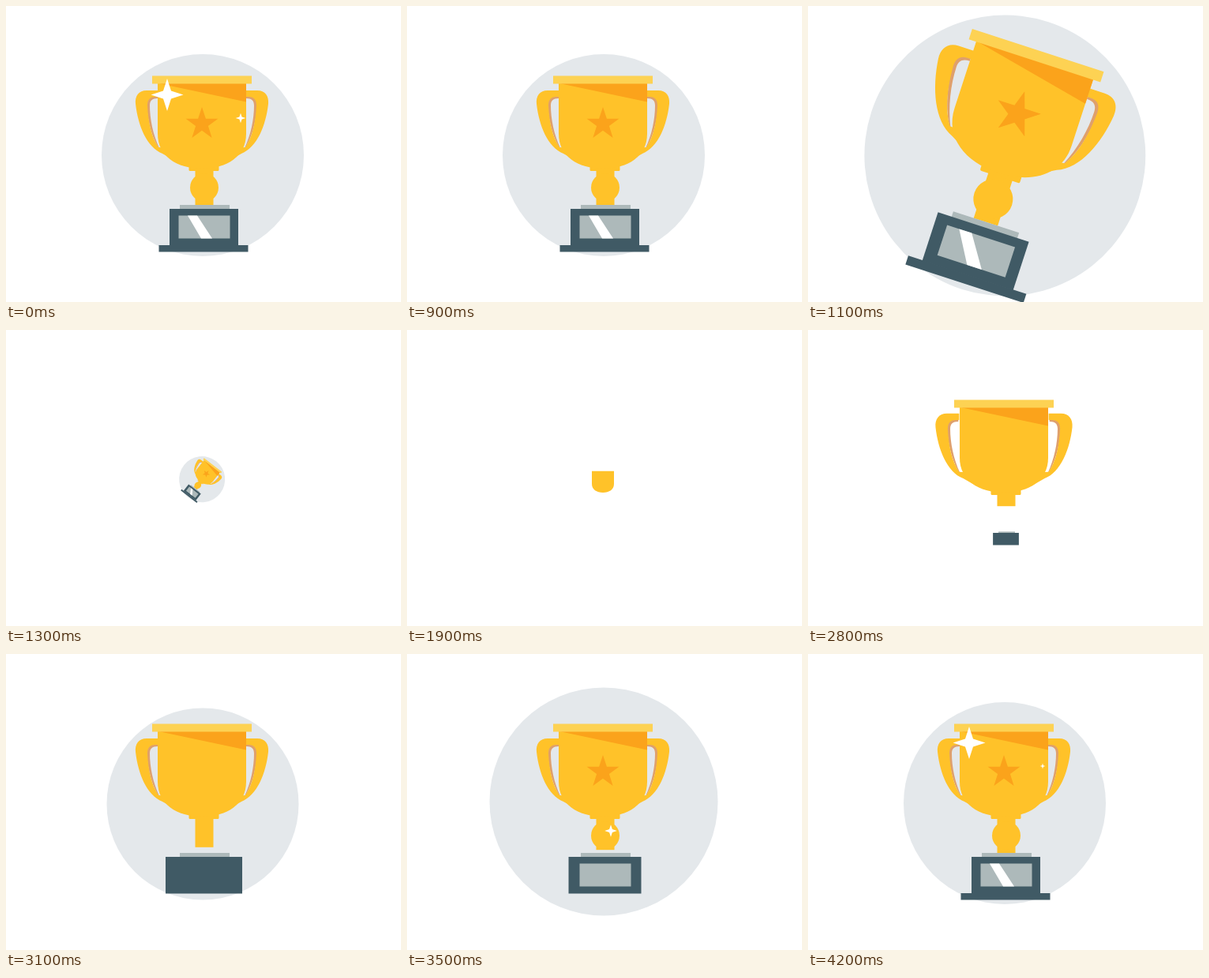
An HTML page for the animation above (4300 ms loop, 500x375 px).

```html
<!DOCTYPE html>
<html lang="en">
<head>
<meta charset="utf-8">
<title>Trophy</title>
<style>
html, body { margin: 0; width: 100%; height: 100%; overflow: hidden; background: #fff; }
svg { display: block; width: 500px; height: 375px; }
.gold { fill: #ffc229; }
.amber { fill: #fba31b; }
.steel { fill: #405a65; }
.plate { fill: #adb9ba; }
.shade { fill: #dfa06c; }
.white { fill: #fff; }
</style>
</head>
<body>
<svg viewBox="0 0 500 375">
  <defs>
    <path id="spark" d="M0-20.5 5-5 20.5 0 5 5 0 20.5-5 5-20.5 0-5-5Z"/>
    <g id="grip">
      <path class="shade" d="M192 114H187C180 115 178 119 178 126C180 149 185 169 196 184L194 180C186 163 182 143 182 126C182 120 185 117 192 117Z"/>
      <path class="gold" fill-rule="evenodd" d="M193 107H178C168 107 163 114 164 124C167 151 178 179 198 187L214 196V180L193 179ZM193 115V179C184 166 180 147 179 126C179 119 182 115 189 115Z"/>
    </g>
  </defs>
  <g id="all">
    <circle id="disc" cx="249" cy="189" r="128" fill="#e4e8eb"/>
    <g id="grips"><use href="#grip"/><use href="#grip" transform="translate(496 0) scale(-1 1)"/></g>
    <rect id="stem" class="gold" x="239.5" y="204" width="23" height="48"/>
    <circle id="ball" class="gold" cx="251" cy="230" r="18"/>
    <rect id="collar" class="gold" x="231.500" y="202" width="38" height="7" rx="1.500"/>
    <path id="cup" class="gold" d="M192 97H304V162C304 190 280 206 248 206S192 190 192 162Z"/>
    <path id="shadow" class="amber" d="M193 98H304V121.500Z"/>
    <rect id="rim" x="185" y="88.500" width="126" height="10" fill="#fdd253"/>
    <path id="star" class="amber"/>
    <rect id="ledge" class="plate" x="220" y="252" width="63" height="5.500"/>
    <rect id="base" class="steel" x="207" y="257" width="87" height="46.500"/>
    <rect id="foot" class="steel" x="193.500" y="303" width="113" height="8.500"/>
    <rect id="panel" class="plate" x="218.500" y="265.500" width="65" height="29"/>
    <path id="shine" class="white" d="M230 265.500H242L261 294.500H247Z"/>
    <use id="flash1" class="white" href="#spark"/>
    <use id="flash2" class="white" href="#spark"/>
    <use id="big" class="white" href="#spark"/>
    <use id="small" class="white" href="#spark"/>
  </g>
</svg>
<script>
const LOOP = 4300, STEP = 100;
const $ = id => document.getElementById(id);

// Piecewise linear value from [time, value] pairs, held at both ends.
function key(t, ...pairs) {
  let [t0, v0] = pairs[0];
  for (const [t1, v1] of pairs) {
    if (t < t1) return t <= t0 ? v0 : v0 + (v1 - v0) * (t - t0) / (t1 - t0);
    t0 = t1;
    v0 = v1;
  }
  return v0;
}

// Scale and turn a part about a pivot.
function pose(id, px, py, sx, sy = sx, turn = 0, dx = 0, dy = 0) {
  const el = $(id);
  el.style.display = sx && sy ? "" : "none";
  el.setAttribute("transform",
    `translate(${px + dx} ${py + dy}) rotate(${turn}) scale(${sx} ${sy}) translate(${-px} ${-py})`);
}

function sparkle(id, x, y, size) {
  $(id).setAttribute("transform", `translate(${x} ${y}) scale(${size})`);
}

function starPath(x, y, outer, inner) {
  const points = Array.from({ length: 10 }, (_, i) => {
    const r = i % 2 ? inner : outer, a = i * Math.PI / 5;
    return [x + r * Math.sin(a), y - r * Math.cos(a)];
  });
  return "M" + points.join("L") + "Z";
}

function draw(time) {
  // The finished trophy runs on past the loop point until it spins away.
  const t = time < 1400 ? time + LOOP : time;
  const grow = (from, to) => key(t, [from, 0], [to, 1]);

  pose("cup", 248, 206, grow(1800, 2200));
  pose("rim", 185, 98, grow(1900, 2100), 1,
    key(t, [2000, -27], [2200, -10], [2300, -4.2], [2400, -2], [2500, 0]),
    key(t, [2000, -12], [2300, 0]));
  pose("shadow", 193, 98, key(t, [2200, 0], [2300, .13], [2700, 1]));
  pose("grips", 248, 150, key(t, [2400, .6], [2700, 1.06], [2900, 1]) * (t > 2400));
  pose("collar", 250.5, 204, grow(2500, 2800));
  pose("stem", 251, 204, 1, key(t, [2600, 0], [3000, .8], [3100, .85], [3500, .92], [3600, 1]));
  pose("ledge", 251.5, 257, grow(2700, 3000));
  pose("base", 250.5, 257,
    key(t, [2700, 0], [3000, 1.13], [3100, 1.115], [3500, 1.057], [3600, 1]), grow(2700, 3000));
  pose("ball", 251, 230, key(t, [3100, 0], [3300, 1.1], [3400, 1]));
  pose("star", 248, 149, key(t, [3100, 0], [3300, 1.15], [3400, 1]));
  pose("panel", 251, 280, grow(3200, 3400));
  pose("foot", 250, 303, grow(3500, 3700));
  pose("shine", 236, 265.5, 1, grow(3600, 3800));

  const r = key(t, [2900, 0], [3000, 89], [3100, 121.5], [3200, 141], [3300, 151],
    [3400, 152], [3500, 144.5], [3600, 127], [3700, 128]);
  pose("disc", 249, 189, r / 128, r / 128, 0, 0,
    key(t, [3100, 1], [3300, -2], [3500, -2], [3600, 0]));

  sparkle("flash1", 208, 190, key(t, [2100, 0], [2300, .85], [2500, 0]));
  sparkle("flash2", 258, 224, key(t, [3300, 0], [3500, .38], [3700, 0]));
  sparkle("big", 204, 112.5, key(t, [3800, 0], [4100, 1], [4400, 1], [4900, 0]));
  sparkle("small", 297, 142, key(t, [4100, 0], [4200, .17], [4300, .31], [4500, .35], [4900, 0]));

  pose("all", 248, 189,
    key(t, [5200, 1], [5300, 1.2], [5400, 1.39], [5500, 1.1], [5600, .227], [5700, 0]), undefined,
    key(t, [5200, 0], [5500, 27], [5600, 38]));
}

$("star").setAttribute("d", starPath(248, 149.5, 21.5, 8.3));

function tick() {
  draw(Math.floor(performance.now() % LOOP / STEP) * STEP);
  requestAnimationFrame(tick);
}
tick();
</script>
</body>
</html>
```
